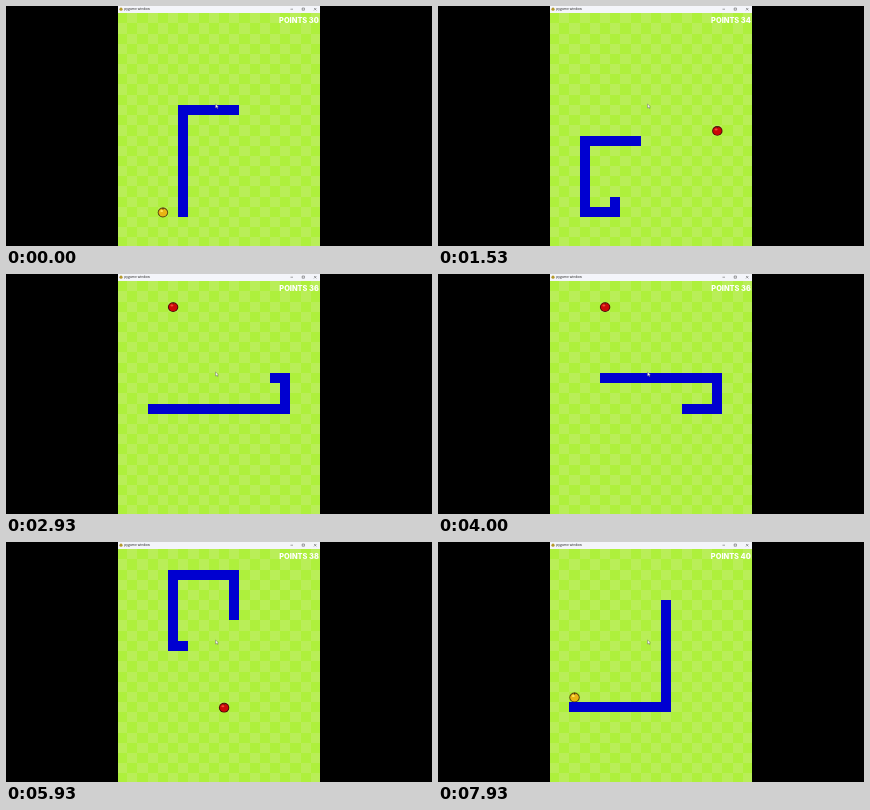
An HTML page with a canvas for the animation above (8000 ms loop, 426 by 240 pixels).

```html
<!DOCTYPE html>
<html lang="en">
<head>
<meta charset="utf-8">
<style>
  html, body { margin: 0; height: 100%; overflow: hidden; background: #000; }
  canvas { display: block; width: 426px; height: 240px; }
</style>
</head>
<body>
<canvas id="stage" width="426" height="240"></canvas>
<script>
const ctx = document.getElementById('stage').getContext('2d');
const LOOP = 8000, FRAME = 1000 / 15;
const CELL = 10.2, LEFT = 111, TOP = 7.1;
const START_LENGTH = 16;

// Corners of the snake's route, from its first tail to its last head.
const corners = [[11, 9], [6, 9], [6, 19], [3, 19], [3, 12], [16, 12],
                 [16, 9], [5, 9], [5, 2], [11, 2], [11, 15], [2, 15]];
const route = [corners[0]];
for (const [col, row] of corners.slice(1)) {
  let [c, r] = route[route.length - 1];
  while (c !== col || r !== row) {
    c += Math.sign(col - c);
    r += Math.sign(row - r);
    route.push([c, r]);
  }
}

// Each fruit appears on the move after the previous one was reached.
const fruits = [
  { from: 0,  col: 4,  row: 19, points: 30, gold: true },
  { from: 3,  col: 16, row: 11, points: 34 },
  { from: 25, col: 5,  row: 2,  points: 36 },
  { from: 45, col: 10, row: 15, points: 38 },
  { from: 65, col: 2,  row: 14, points: 40, gold: true }
];

const cellX = col => Math.round(LEFT + col * CELL);
const cellY = row => Math.round(TOP + row * CELL);

function fillCell(col, row, color) {
  const x = cellX(col), y = cellY(row);
  ctx.fillStyle = color;
  ctx.fillRect(x, y, cellX(col + 1) - x, cellY(row + 1) - y);
}

function polygon(points, fill, stroke, width) {
  ctx.beginPath();
  points.forEach(([x, y]) => ctx.lineTo(x, y));
  ctx.closePath();
  ctx.fillStyle = fill;
  ctx.fill();
  ctx.strokeStyle = stroke;
  ctx.lineWidth = width;
  ctx.stroke();
}

function ellipse(x, y, rx, ry, fill) {
  ctx.beginPath();
  ctx.ellipse(x, y, rx, ry, 0, 0, Math.PI * 2);
  ctx.fillStyle = fill;
  ctx.fill();
}

function drawField() {
  for (let row = 0; row < 23; row++)
    for (let col = 0; col < 20; col++)
      fillCell(col, row, (col + row) % 2 ? '#b9ee58' : '#aef03c');
}

function drawFruit({ col, row, gold }) {
  const x = LEFT + (col + 0.5) * CELL, y = TOP + (row + 0.5) * CELL + 0.5;
  ellipse(x, y, 5.2, 4.9, gold ? '#57430c' : '#4a0808');
  ellipse(x, y, 4.3, 4, gold ? '#e8b414' : '#cc0808');
  ellipse(x - 1.2, y - 1.5, 1.5, 1, gold ? '#ffe45c' : '#f04a3c');
  ctx.fillStyle = '#4a3010';
  ctx.fillRect(x - 0.5, y - 4.8, 1.2, 1.8);
}

function drawTitleBar() {
  ctx.fillStyle = '#f4f5fa';
  ctx.fillRect(112, 0, 202, 7);
  ellipse(115, 3.2, 1.6, 1.6, '#b59a2c');
  ctx.fillStyle = '#222';
  ctx.font = '3.4px "Open Sans", sans-serif';
  ctx.textAlign = 'left';
  ctx.fillText('pygame window', 118.3, 4.3);
  ctx.strokeStyle = '#444';
  ctx.lineWidth = 0.5;
  ctx.beginPath();
  ctx.moveTo(284.5, 3.2); ctx.lineTo(287, 3.2);
  ctx.rect(296.2, 2, 2.2, 2.2);
  ctx.moveTo(308, 2); ctx.lineTo(310.4, 4.4);
  ctx.moveTo(310.4, 2); ctx.lineTo(308, 4.4);
  ctx.stroke();
}

function draw(time) {
  const t = Math.floor((time % LOOP + 4) / FRAME) * FRAME;
  const step = Math.floor(Math.min(0.95 + t / 108.5, 1.23 + t / 110.7));
  const eaten = fruits.filter(f => f.from <= step).length - 1;
  const fruit = fruits[eaten];
  const head = START_LENGTH + step;

  ctx.fillStyle = '#000';
  ctx.fillRect(0, 0, 426, 240);
  ctx.save();
  ctx.beginPath();
  ctx.rect(112, 0, 202, 240);
  ctx.clip();
  drawField();
  drawFruit(fruit);
  for (const [col, row] of route.slice(head - START_LENGTH - eaten, head))
    fillCell(col, row, '#0000d0');
  drawTitleBar();
  ctx.fillStyle = '#fff';
  ctx.font = '800 7.4px Inter, sans-serif';
  ctx.textAlign = 'right';
  ctx.fillText('POINTS ' + fruit.points, 312.8, 17);
  polygon([[209.5, 98], [209.5, 102], [210.5, 101.2], [211.3, 102.6],
           [212, 102.2], [211.3, 100.9], [212.4, 100.7]], '#fff', '#555', 0.4);
  ctx.restore();
}

const start = performance.now();
function tick() {
  draw(performance.now() - start);
  requestAnimationFrame(tick);
}
tick();
</script>
</body>
</html>
```
